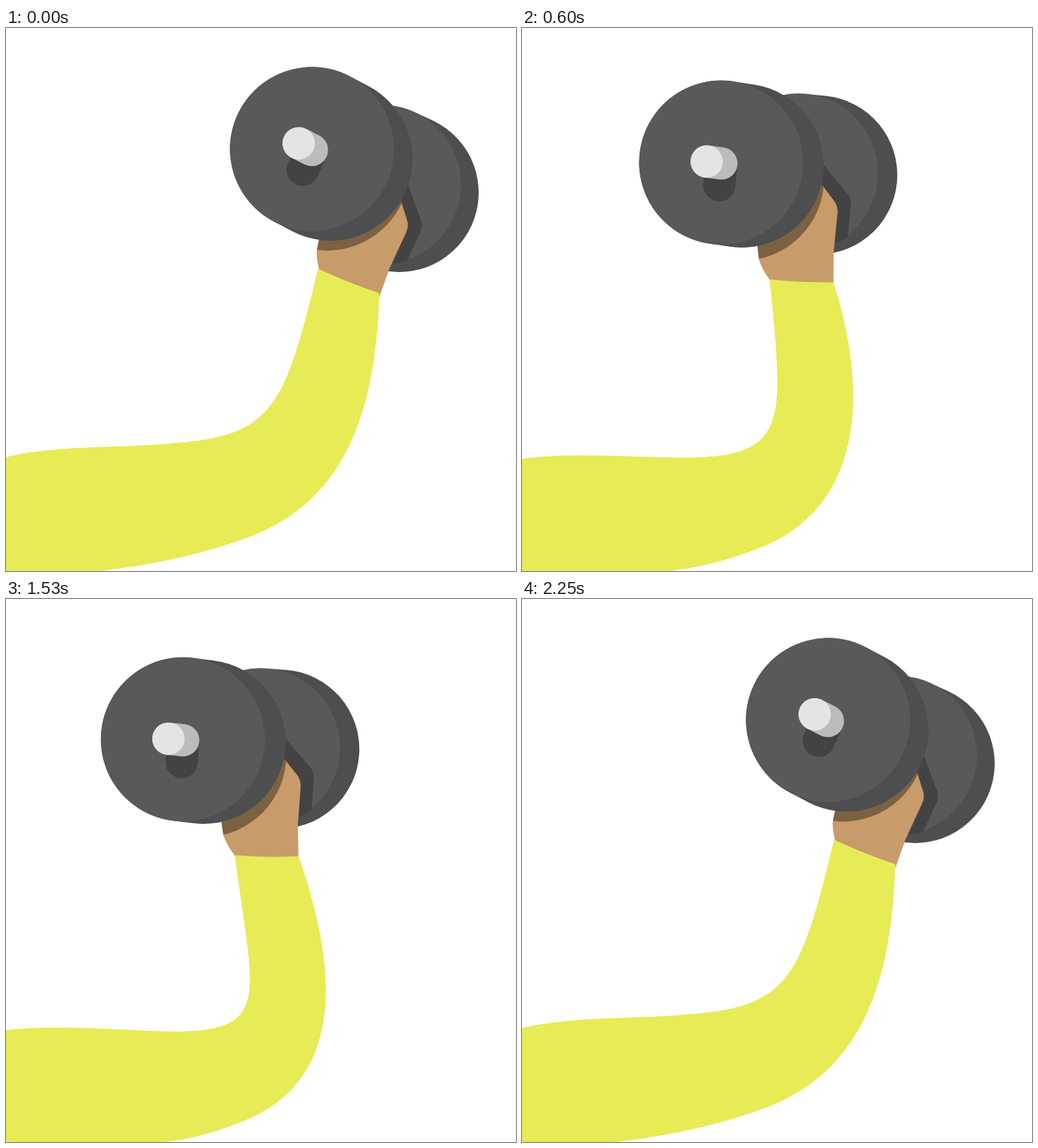
These frames come from a looping animation (725x772 px, 2.28 s). An HTML page:

```html
<!DOCTYPE html>
<html lang="en">
<head>
<meta charset="utf-8">
<title>Dumbbell curl</title>
<style>
  html, body { margin: 0; width: 100%; height: 100%; overflow: hidden; background: #fff; }
  svg { display: block; }
  line { stroke-linecap: round; }
  .face { fill: #59595b; }
  .rim { stroke: #4d4e50; }
  .dark { fill: #434343; stroke: #434343; }
  .skin { fill: #c79b6a; }
  .shade { fill: #7c6143; }
  .sleeve { fill: #e7eb56; }
</style>
</head>
<body>
<svg width="725" height="772" viewBox="0 0 725 772">
  <defs>
    <path id="palm" d="M120 10L145.5 33.5L161 54Q167 62 165.7 72L160.5 128V170L157 177L73 172L69.5 166Q58 150 54.5 137.5L52 118Z"/>
    <clipPath id="inPalm"><use href="#palm"/></clipPath>
  </defs>
  <g id="back">
    <line class="rim" x1="110" y1="14.5" x2="137.5" y2="17" stroke-width="226"/>
    <circle class="face" cx="110" cy="14.5" r="113"/>
    <path class="dark" stroke-width="0" d="M140 -5L147.5 4.5L181 45Q185.5 52 184.6 61L180.5 104.5Q171 112 158 116L120 60Z"/>
  </g>
  <g id="hand">
    <use class="skin" href="#palm"/>
    <circle class="shade" cx="29.5" cy="22.5" r="117" clip-path="url(#inPalm)"/>
  </g>
  <path id="sleeve" class="sleeve"/>
  <g id="front">
    <line class="rim" x1="0" y1="0" x2="29.5" y2="4.3" stroke-width="233"/>
    <circle class="face" r="116.7"/>
    <line class="dark" x1=".3" y1="1.3" x2="-2.5" y2="32.3" stroke-width="46"/>
    <line x1="-20.5" y1="-1.3" x2=".3" y2="1.3" stroke="#babcbe" stroke-width="46"/>
    <circle cx="-20.5" cy="-1.3" r="23" fill="#e4e4e6"/>
  </g>
</svg>
<script>
const LOOP = 2280, STEP = 30;
const START = 435, CURLED = 279, END = 250.8;
const byId = id => document.getElementById(id);
const back = byId('back'), hand = byId('hand'), front = byId('front'), sleeve = byId('sleeve');

const mix = (a, b, k) => a + (b - a) * k;

// cubic-bezier(.44, 0, .46, 1)
function ease(x) {
  let lo = 0, hi = 1;
  for (let i = 0; i < 24; i++) {
    const s = (lo + hi) / 2, r = 1 - s;
    if (1.32 * s * r * r + 1.38 * s * s * r + s * s * s < x) lo = s; else hi = s;
  }
  return lo * lo * (3 - 2 * lo);
}

// Dumbbell x: lift, slow drift, return, short rest.
function reach(t) {
  if (t < 700) return mix(START, CURLED, ease(t / 700));
  if (t < 1550) return mix(CURLED, END, (t - 700) / 850);
  return mix(END, START, ease(Math.min(1, (t - 1550) / 700)));
}

// Point at (dx, dy) from p, in axes turned by deg.
function offset([x, y], deg, dx, dy) {
  const a = deg * Math.PI / 180, c = Math.cos(a), s = Math.sin(a);
  return [x + dx * c - dy * s, y + dx * s + dy * c];
}

// The cuff follows the dumbbell; each edge leaves it along the forearm and bends into the upper arm.
function sleevePath(grip, tilt, k) {
  const left = offset(grip, tilt, 69.8 - .25 * tilt, 165.8 - .42 * tilt);
  const right = offset(grip, tilt, 160.5 - .1 * tilt, 169.5 - .42 * tilt);
  const cuff = [(left[0] + right[0]) / 2, (left[1] + right[1]) / 2 + 3];
  const crook = 590 + 25 * k, under = 722 + 15 * k;
  return `M0 ${610 + 3 * k}C75 ${592 + 12 * k} 165 ${598 + 16 * k} 240 ${crook}` +
    `C380 ${crook - 10 * (1 - k)} ${offset(left, tilt - 6, 0, 200)} ${left}` +
    `Q${cuff} ${right}` +
    `C${offset(right, tilt - 18, 0, 175)} 478 ${under - 50 - 10 * k} 350 ${under}` +
    `Q${255 + 25 * k} ${under + 36 - 6 * k} ${135 + 90 * k} 772H0Z`;
}

function draw(t) {
  const x = reach(t), k = (START - x) / (START - END);
  const y = 172 + 14 * k + 13.7 * k ** 3;
  const tilt = 19.5 - 20.8 * Math.min(1, .78 * k + .5 * k ** 3);
  const place = `translate(${x} ${y}) rotate(${tilt})`;
  back.setAttribute('transform', place);
  front.setAttribute('transform', place);
  hand.setAttribute('transform', `${place} translate(0 ${-tilt / 5})`);
  sleeve.setAttribute('d', sleevePath([x, y], tilt, k));
}

function tick() {
  const t = performance.now() % LOOP;
  draw(Math.floor(t / STEP) * STEP);
  requestAnimationFrame(tick);
}
tick();
</script>
</body>
</html>
```
